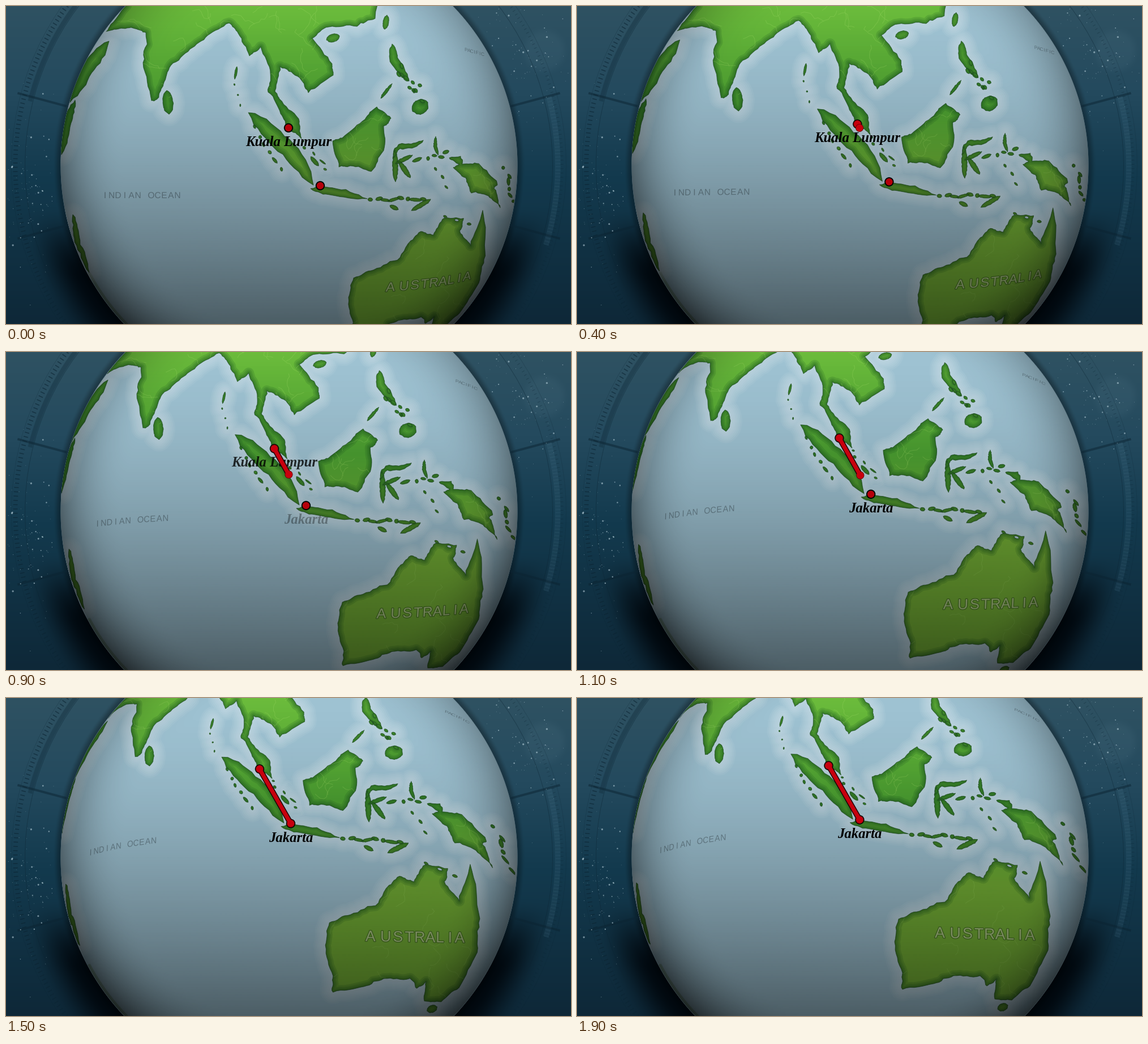
Recreate the animation shown at these times as a matplotlib script. Size 998 px wide and 561 px high, loop 2000 ms.

```python
import numpy as np
import matplotlib.pyplot as plt
from matplotlib.animation import FuncAnimation
from matplotlib.collections import LineCollection
from matplotlib.patches import Circle, PathPatch
from matplotlib.path import Path
from matplotlib.textpath import TextPath

W, H, N = 998, 561, 20
CX, CY, R = 499.5, 282, 403
D = 2.42                                  # camera distance in globe radii
F = R * np.sqrt(D * D - 1)
rng = np.random.default_rng(7)


def rgb(*c):
    return tuple(v / 255 for v in c)


def ramp(x):
    x = np.clip(x, 0, 1)
    return x * x * (3 - 2 * x)


def ease(u):
    return u**3 * (10 - 15 * u + 6 * u * u)


# ---------- globe geometry ----------
def view(s):
    """Rotation matrix of the globe at travel progress s."""
    lat, lon = np.radians([-3 - 9.4 * s, 101.69 + 5.16 * s])
    sa, ca, so, co = np.sin(lat), np.cos(lat), np.sin(lon), np.cos(lon)
    return np.array([[-so, co, 0], [-sa * co, -sa * so, ca], [ca * co, ca * so, sa]])


def ground(pts, s):
    """Screen points in the view at s -> unit vectors on the globe."""
    p = np.asarray(pts, float)
    a, b = (p[:, 0] - CX) / F, (CY - p[:, 1]) / F
    q = a * a + b * b + 1
    t = (D - np.sqrt(np.maximum(D * D - q * (D * D - 1), 0))) / q
    v = np.column_stack([a * t, b * t, D - t])
    return v / np.linalg.norm(v, axis=1)[:, None] @ view(s)


def project(vecs, m):
    x, y, z = (vecs @ m.T).T
    rho = np.hypot(x, y) + 1e-9
    k = np.where(z < 1 / D, np.sqrt(1 - 1 / D**2) / rho, 1)
    z = np.maximum(z, 1 / D)
    return np.column_stack([CX + F * x * k / (D - z), CY - F * y * k / (D - z)])


# ---------- outlines ----------
def rough(pts, rounds):
    """Break an outline into a ragged coast."""
    p = np.asarray(pts, float)
    for _ in range(rounds):
        d = np.roll(p, -1, 0) - p
        off = np.clip(rng.normal(0, .09, len(p)), -.18, .18)
        off *= np.minimum(1, 14 / (np.hypot(*d.T) + .01))
        mid = p + d / 2 + off[:, None] * d[:, ::-1] * [-1, 1]
        p = np.stack([p, mid], 1).reshape(-1, 2)
    return p


def ring(pts, s, closed=True):
    if closed:
        pts = np.vstack([pts, pts[:1]])
    codes = [Path.MOVETO] + [Path.LINETO] * (len(pts) - 1)
    if closed:
        codes[-1] = Path.CLOSEPOLY
    return ground(pts, s), codes


def coast(pts, s=0):
    return ring(rough(pts, 3), s)


def strip(width, *spine, s=0):
    """Long island: a spine with rounded, tapering sides."""
    p = np.array(spine, float)
    t = np.linspace(0, 1, 9)
    c = np.column_stack([np.interp(t, np.linspace(0, 1, len(p)), v) for v in p.T])
    g = np.gradient(c, axis=0)
    side = g[:, ::-1] * [-1, 1] / np.hypot(*g.T)[:, None]
    side *= width / 2 * np.sqrt(np.abs(np.sin(np.pi * t)))[:, None]
    return ring(rough(np.vstack([c + side, (c - side)[::-1]]), 1), s)


def chain(a, b, n, size, spread):
    """Islets strung from a to b."""
    a, b = np.array(a, float), np.array(b, float)
    along = (b - a) / np.hypot(*(b - a))
    out = []
    for t in np.linspace(0, 1, n):
        c = a + (b - a) * t + rng.normal(0, spread, 2)
        half = (along + rng.normal(0, .3, 2)) * size * rng.uniform(.3, .65)
        out.append(strip(size * rng.uniform(.4, .65), c - half, c + half))
    return out


def streams(n, x0, x1, y0, y1, s):
    out = []
    for _ in range(n):
        a = rng.uniform(0, 2 * np.pi) + np.cumsum(rng.normal(0, .55, 9))
        step = np.column_stack([np.cos(a), np.sin(a)]) * 6
        out.append(ring(rng.uniform([x0, y0], [x1, y1]) + np.cumsum(step, 0), s, False))
    return out


def lettering(text, x0, x1, y, size, s, slope=0, bend=1):
    parts = []
    for i, ch in enumerate(text):
        if ch == ' ':
            continue
        t = TextPath((0, 0), ch, size=size, prop={'family': 'Liberation Sans'})
        box = t.get_extents()
        x = x0 + (x1 - x0) * (i / (len(text) - 1)) ** bend
        x = x + t.vertices[:, 0] - (box.x0 + box.x1) / 2
        pts = np.column_stack([x, y - t.vertices[:, 1] + slope * (x - x0)])
        parts.append((ground(pts, s), t.codes))
    return parts


def merge(parts):
    return np.vstack([p[0] for p in parts]), np.concatenate([p[1] for p in parts])


# ---------- the map: a few key points per coast ----------
asia = [(230, -25), (190, 28), (177, 45), (200, 40), (228, 40), (247, 47), (242, 100),
        (257, 167), (270, 161), (278, 138), (291, 105), (325, 76), (356, 52), (394, 30),
        (410, 48), (430, 88), (450, 72), (467, 120), (463, 152), (485, 190), (498, 217),
        (522, 234), (517, 199), (483, 164), (475, 150), (484, 107), (515, 124), (534, 153),
        (578, 122), (576, 102), (541, 57), (570, 37), (620, 36), (652, 22), (662, -25)]
borneo = [(577, 238), (598, 229), (634, 200), (655, 178), (680, 198), (667, 212),
          (667, 255), (645, 292), (608, 282), (588, 284)]
guinea = [(783, 268), (803, 265), (806, 279), (835, 278), (868, 315), (862, 322),
          (873, 356), (852, 335), (822, 330), (812, 303), (790, 285), (800, 279)]
australia = [(568, 390), (605, 376), (655, 355), (668, 330), (692, 308), (718, 318),
             (734, 290), (778, 295), (772, 318), (799, 353), (818, 288), (836, 385),
             (832, 445), (800, 508), (768, 533), (738, 531), (741, 496), (724, 508),
             (712, 490), (665, 490), (630, 504), (575, 514), (575, 485), (561, 430)]

land = merge([
    coast(asia), coast(borneo), coast(guinea), coast(australia, 1),
    strip(22, (182, 62), (142, 112), (113, 170)),                  # Arabia
    strip(14, (122, 166), (108, 205), (98, 262)),                  # Africa
    strip(10, (118, 368), (126, 415), (147, 470)),                 # Madagascar
    strip(18, (284, 149), (288, 191)),                             # Sri Lanka
    strip(14, (566, 60), (589, 53)),                               # Hainan
    strip(10, (673, 16), (669, 41)),                               # Taiwan
    strip(15, (682, 67), (685, 95), (712, 132)),                   # Luzon
    strip(25, (718, 186), (745, 170)),                             # Mindanao
    strip(5, (662, 163), (682, 137)),                              # Palawan
    strip(30, (428, 188), (470, 226), (511, 266), (543, 316)),     # Sumatra
    strip(13, (538, 322), (575, 327), (638, 340)),                 # Java
    strip(8, (684, 268), (691, 248), (720, 247), (737, 237)),      # Sulawesi
    strip(10, (687, 254), (688, 310)),
    strip(7, (688, 278), (718, 263)),
    strip(9, (694, 274), (714, 303)),
    strip(6, (759, 230), (758, 247), (763, 263)),                  # Halmahera
    strip(8, (716, 361), (750, 341)),                              # Timor
    strip(7, (678, 352), (693, 359)),                              # Sumba
    strip(7, (538, 266), (552, 282)),                              # Bangka
    strip(4, (408, 107), (404, 129)),                              # Andaman
    strip(13, (743, 549), (761, 542), s=1),                        # Tasmania
    *chain((404, 139), (414, 175), 3, 4, 1),
    *chain((440, 214), (485, 287), 6, 9, 1.5),
    *chain((521, 240), (567, 282), 5, 7, 3),
    *chain((644, 342), (738, 340), 8, 11, 1),
    *chain((697, 119), (734, 159), 11, 11, 7),
    *chain((724, 272), (783, 259), 5, 11, 3),
    *chain((757, 286), (778, 320), 3, 7, 2),
    *chain((774, 372), (818, 384), 3, 7, 1),
    *chain((882, 288), (893, 346), 6, 9, 3)])
veins = merge(streams(40, 190, 640, 0, 140, 0) + streams(7, 590, 665, 200, 285, 0)
              + streams(4, 805, 860, 285, 335, 0) + streams(14, 570, 830, 320, 500, 1))
sea_names = merge(lettering('INDIAN OCEAN', 175, 303, 339, 15.5, 0)
                  + lettering('PACIFIC', 813, 842, 80, 8.5, 0, .27))
land_name = merge(lettering('AUSTRALIA', 641, 800, 423, 27, 1, .025, .85))
capitals = ground([(499, 215), (555, 317)], 0)

# ---------- still picture ----------
fig = plt.figure(figsize=((W + .01) / 72, (H + .01) / 72), dpi=72)
ax = fig.add_axes([0, 0, 1, 1])
ax.set_axis_off()

yy, xx = np.mgrid[0:H, 0:W] + .5
rad = np.hypot(xx - CX, yy - CY)


def fade(rows, *cols):
    return np.stack([np.interp(yy, rows, c) for c in zip(*cols)], -1) / 255


def picture(data, z):
    return ax.imshow(np.clip(data, 0, 1), extent=(0, W, H, 0), zorder=z, aspect='auto')


space = fade((0, 150, 300, H), (47, 82, 98), (36, 74, 94), (19, 58, 78), (14, 40, 56))
gloom = (ramp(1 - (rad - R - 8) / 78) * ramp((yy - 350) / 130))[..., None]
space = space * (1 - gloom) + np.array(rgb(1, 8, 14)) * gloom
space *= (1 - .3 * ramp(1 - (rad - R) / 14))[..., None]
space += .025 * ramp(1 - (np.hypot(xx - 950, yy - 80) - 25) / 20)[..., None]
disc = np.clip(R - rad + .5, 0, 1)
cover = disc[..., None]
picture(space * (1 - cover) + np.array(rgb(158, 194, 210)) * cover, 0)
land_im = picture(fade((0, 180, 330), (108, 188, 60), (76, 160, 50), (118, 178, 55)), 3)

# the globe darkens downwards and towards its rim
low = .52 * (yy / H) ** 1.6
rim = (.24 + .32 * yy / H) * np.clip((rad / R - .72) / .28, 0, 1) ** 2
shade = np.zeros((H, W, 4))
shade[..., 3] = disc * (1 - (1 - low) * (1 - rim))
picture(shade, 8)
ax.set_xlim(0, W)
ax.set_ylim(H, 0)


def polar(r, deg):
    a = np.radians(deg)
    return np.stack([CX + r * np.cos(a), CY - r * np.sin(a)], -1)


def arc(r, a0, a1, lw, col, alpha):
    ax.plot(*polar(r, np.linspace(a0, a1, 120)).T, lw=lw, color=col, alpha=alpha,
            zorder=1, solid_capstyle='butt')


def spokes(degs, r0, r1, lw, col, alpha):
    segs = [[polar(r0, d), polar(r1, d)] for d in degs]
    ax.add_collection(LineCollection(segs, lw=lw, colors=[col], alpha=alpha, zorder=1))


ink, pale = rgb(12, 36, 50), rgb(92, 138, 162)
arc(466, 0, 360, 1, ink, .4)
arc(471, 128, 166, 8, ink, .3)
arc(490, 0, 360, .8, ink, .25)
arc(475, -17, 15, 10, pale, .11)
spokes(np.arange(120, 240, .9), 479, 487, 1.6, ink, .6)
spokes(np.arange(-60, 60, .9), 480, 485, 1, ink, .35)
spokes(np.arange(-17, 15, .7), 471, 480, .8, pale, .18)
spokes([15, 165, 195, 345], R + 3, 496, 4, ink, .5)
arc(R - 3, 208, 227, 5, rgb(70, 105, 35), .3)

stars = np.vstack([rng.normal([45, 320], [28, 65], (110, 2)),
                   rng.normal([905, 85], [50, 65], (110, 2))])
stars = stars[np.hypot(*(stars - [CX, CY]).T) > R + 12]
ax.scatter(*stars.T, s=.6 + 11 * rng.random(len(stars)) ** 7, color=rgb(195, 218, 228),
           lw=0, alpha=.55, zorder=1)

# ---------- moving parts ----------
globe = Circle((CX, CY), R, transform=ax.transData)
moving = []


def patch(geo, z, clip=None, **kw):
    p = PathPatch(Path([(0, 0), (1, 1)]), zorder=z, joinstyle='round', capstyle='round', **kw)
    ax.add_patch(p)
    if clip is not None:
        p.set_clip_path(clip)
    moving.append((p, geo))
    return p


for w in range(6, 48, 6):
    patch(land, 2, globe, fill=False, ec=rgb(220, 234, 240), lw=w, alpha=.095)
inner = [patch(land, 4, fill=False, ec=rgb(24, 84, 30), lw=w, alpha=.17)
         for w in (4, 8, 13, 19)]
inner.append(patch(veins, 5, fill=False, ec=rgb(165, 222, 105), lw=1, alpha=.28))
patch(land, 5, globe, fill=False, ec=rgb(22, 66, 30), lw=1, alpha=.6)
patch(sea_names, 6, globe, fc=rgb(62, 78, 86), lw=0, alpha=.5)
patch(land_name, 6, fc='none', ec=rgb(38, 72, 24), lw=2.6, alpha=.5)
patch(land_name, 7, fc=rgb(205, 225, 165), lw=0, alpha=.8)

red = rgb(200, 0, 14)
dots = [Circle((0, 0), 7.2, fc=rgb(182, 0, 10), ec='black', lw=1.9, zorder=10)
        for _ in capitals]
knobs = [Circle((0, 0), 6.6, fc=red, ec=rgb(95, 0, 6), lw=.8, zorder=14) for _ in capitals]
for c in dots + knobs:
    ax.add_patch(c)
casing, = ax.plot([], [], color=rgb(30, 0, 4), lw=10, solid_capstyle='round', zorder=13)
route, = ax.plot([], [], color=red, lw=7, solid_capstyle='round', zorder=15)
labels = [ax.text(0, 0, name, family='Liberation Serif', style='italic', weight='bold',
                  size=24.8, ha='center', va='baseline', zorder=12)
          for name in ('Kuala Lumpur', 'Jakarta')]


def draw(i):
    s = ease(i / (N - 1))
    m = view(s)
    for p, (vecs, codes) in moving:
        p.set_path(Path(project(vecs, m), codes))
    shape = Path(project(land[0], m), land[1])
    for p in inner + [land_im]:
        p.set_clip_path(shape, ax.transData)

    # the route runs slightly ahead of the turning globe
    q = min(1, s + .08 * s**3)
    a, b = project(capitals, m)
    tip = project(capitals[:1] * (1 - q) + capitals[1:] * q, m)[0]
    dots[0].center, dots[1].center = a, b
    knobs[0].center, knobs[1].center = a, tip
    for k in knobs:
        k.set_visible(i > 0)
    for line in (casing, route):
        line.set_data([a[0], tip[0]], [a[1], tip[1]])
        line.set_visible(np.hypot(*(tip - a)) > 8)

    alphas = np.clip([(11 - i) / 2.5, (i - 8) / 3], 0, 1)
    for label, at, alpha in zip(labels, (a, b), alphas):
        label.set_position((at[0], at[1] + 32))
        label.set_alpha(alpha)
        label.set_visible(alpha > 0)


anim = FuncAnimation(fig, draw, frames=N, interval=100, repeat=True, repeat_delay=0)
plt.show()
```
